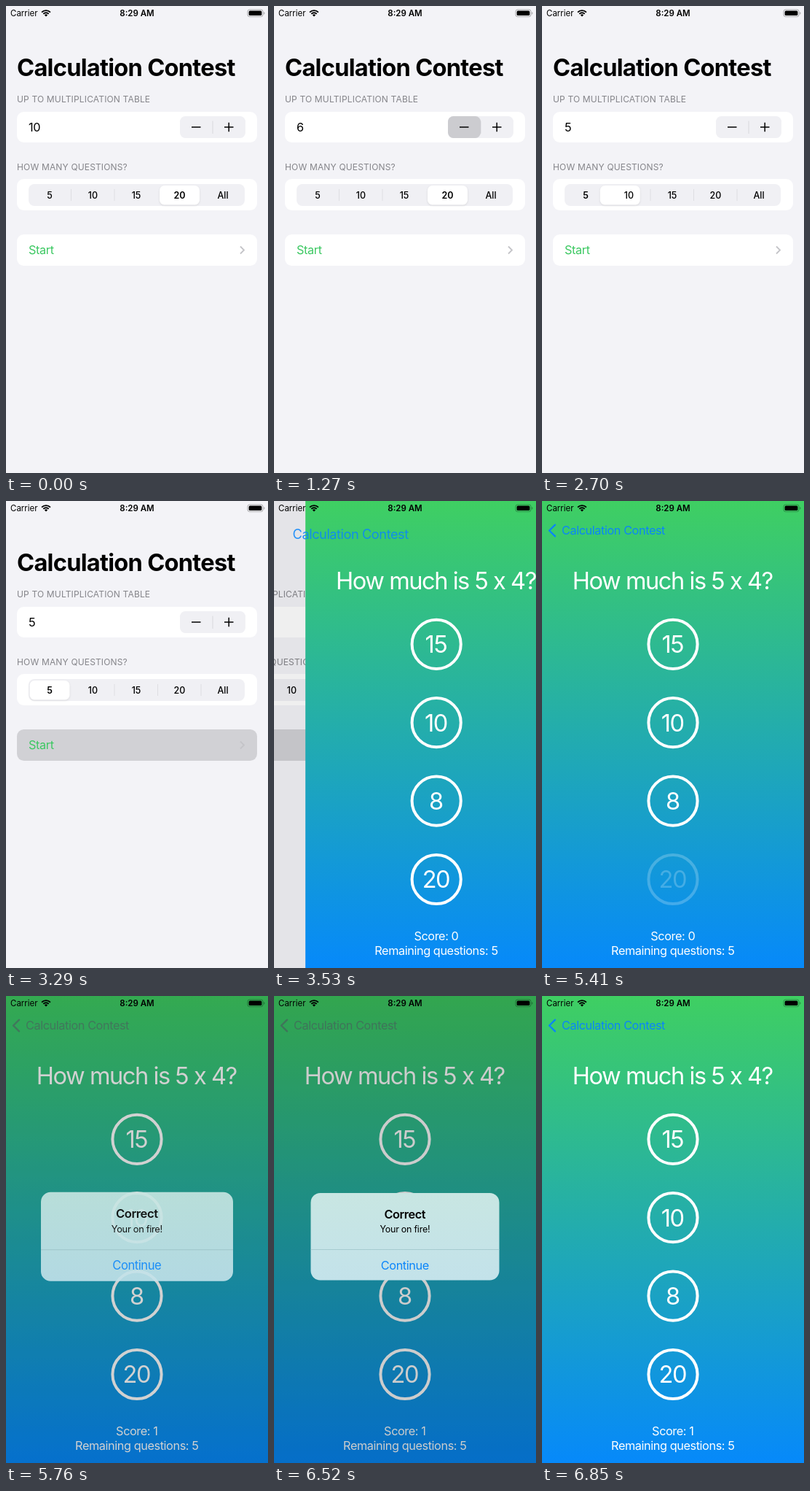
An HTML page with a canvas that plays this animation: 360 px wide and 640 px high, repeating every 8 s.

```html
<!DOCTYPE html>
<html lang="en">
<head>
<meta charset="utf-8">
<title>Calculation Contest</title>
<style>
html, body { margin: 0; width: 100%; height: 100%; overflow: hidden; }
canvas { display: block; width: 360px; height: 640px; }
</style>
</head>
<body>
<canvas id="stage"></canvas>
<script>
const LOOP = 8000, W = 360, H = 640;
const TITLE = 'Calculation Contest';
const BODY = 16.3, SMALL = 12.5, LARGE = 32.6, TIGHT = -0.045;
const BLUE = '#0a85fa', FILL = '#f0f0f4';

const canvas = document.getElementById('stage');
const ctx = canvas.getContext('2d');
const dpr = window.devicePixelRatio || 1;
canvas.width = W * dpr;
canvas.height = H * dpr;

// Bursts of motion: start, end, number of pictures. Between them all is still.
const bursts = [
  [700, 1380, 7], [1610, 1830, 3], [2700, 2930, 3],
  [3290, 3760, 5], [5410, 5960, 6], [6410, 6850, 5]
];

function snap(t) {
  let held = 0;
  for (const [start, end, count] of bursts) {
    if (t < start) break;
    const step = (end - start) / (count - 1);
    held = t >= end ? end : start + Math.floor((t - start) / step) * step;
  }
  return held;
}

const clamp = v => Math.max(0, Math.min(1, v));
const mix = (a, b, p) => a + (b - a) * p;
const easeOut = (t, start, length, power = 3) =>
  1 - Math.pow(1 - clamp((t - start) / length), power);

// y is the middle of the capital letters
function text(str, x, y, size, { color = '#000', weight = 400, align = 'left', track = -0.026 } = {}) {
  const spacing = size * track;
  ctx.font = `${weight} ${size}px Inter, "Open Sans", sans-serif`;
  ctx.letterSpacing = spacing + 'px';
  ctx.textAlign = align;
  ctx.fillStyle = color;
  ctx.fillText(str, align === 'center' ? x + spacing / 2 : x, y + size * 0.364);
}

function box(x, y, w, h, r, color) {
  ctx.beginPath();
  ctx.roundRect(x, y, w, h, r);
  ctx.fillStyle = color;
  ctx.fill();
}

function line(points, width, color) {
  ctx.beginPath();
  points.forEach(([x, y]) => ctx.lineTo(x, y));
  ctx.lineWidth = width;
  ctx.strokeStyle = color;
  ctx.stroke();
}

function faded(alpha, draw) {
  if (alpha <= 0) return;
  ctx.save();
  ctx.globalAlpha *= alpha;
  draw();
  ctx.restore();
}

function vertical(y0, y1, from, to) {
  const g = ctx.createLinearGradient(0, y0, 0, y1);
  g.addColorStop(0, from);
  g.addColorStop(1, to);
  return g;
}

function stepper(t) {
  const taps = [700, 890, 1080, 1260, 1610].filter(tap => tap <= t);
  const glow = taps.length ? 1 - clamp((t - taps[taps.length - 1]) / 120) : 0;
  text(String(10 - taps.length), 31, 166, BODY);
  box(239, 151, 90, 30, 7.5, FILL);
  box(283.5, 157.5, 1, 17.5, 0, '#d8d8dc');
  faded(glow, () => box(239, 151, 45, 30, 7.5, '#cbcbcf'));
  line([[255, 166], [267.5, 166]], 1.5, '#000');
  line([[300, 166], [312.5, 166]], 1.5, '#000');
  line([[306.2, 159.7], [306.2, 172.3]], 1.5, '#000');
}

function segments(t) {
  const labels = ['5', '10', '15', '20', 'All'];
  const width = 59.5;
  const chosen = t < 2700 ? 3 : 0;
  const pill = mix(3, 0, t < 2700 ? 0 : easeOut(t, 2590, 340, 3.4));
  box(31, 244, 297, 30, 8, FILL);
  for (let i = 0; i < 4; i++) {
    if (i !== chosen && i !== chosen - 1) box(89 + i * width, 251, 1, 16, 0, '#dedee2');
  }
  ctx.save();
  ctx.shadowColor = 'rgba(0,0,0,.1)';
  ctx.shadowBlur = 3 * dpr;
  ctx.shadowOffsetY = dpr;
  box(32.5 + pill * width, 246, 55, 26.5, 6.5, '#fff');
  ctx.restore();
  labels.forEach((label, i) => text(label, 60 + i * width, 259, SMALL,
    { weight: i === chosen ? 600 : 500, align: 'center', track: 0 }));
}

function settings(t) {
  const grey = { color: '#85858a', track: 0.013 };
  ctx.fillStyle = '#f3f3f7';
  ctx.fillRect(0, 0, W, H);
  text('UP TO MULTIPLICATION TABLE', 15, 128, 12, grey);
  box(15, 145, 330, 42, 9.5, '#fff');
  stepper(t);
  text('HOW MANY QUESTIONS?', 15, 220.5, 12, grey);
  box(15, 237, 330, 43, 9.5, '#fff');
  segments(t);
  box(15, 313, 330, 43, 9.5, t >= 3290 ? '#d1d1d5' : '#fff');
  text('Start', 31, 334.5, BODY, { color: '#3cc862' });
  line([[322, 329.5], [327, 334.5], [322, 339.5]], 1.8, '#c4c4c8');
}

function quiz(t) {
  const white = { color: '#fff', align: 'center' };
  const big = { ...white, track: TIGHT };
  ctx.fillStyle = vertical(0, H, '#3fcf62', '#0689fa');
  ctx.fillRect(0, 0, W, H);
  text('How much is 5 x 4?', 180, 109, LARGE, big);
  [15, 10, 8, 20].forEach((answer, i) => {
    const y = 196.3 + i * 107.4;
    const pressed = i === 3 && t >= 5410;
    faded(pressed ? mix(0.22, 1, clamp((t - 5480) / 250)) : 1, () => {
      ctx.beginPath();
      ctx.arc(180, y, 33.6, 0, 7);
      ctx.lineWidth = 4;
      ctx.strokeStyle = '#fff';
      ctx.stroke();
      text(String(answer), 180, y, LARGE, big);
    });
  });
  text('Score: ' + (t < 5480 ? 0 : 1), 180, 596.5, BODY, white);
  text('Remaining questions: 5', 180, 616.5, BODY, white);
}

// The large heading shrinks into the label of the back button.
function heading(t, push) {
  const x = mix(15, 27, push), y = mix(84.5, 40.5, push), size = mix(LARGE, BODY, push);
  const color = t >= 5500 && t < 6600 ? '#4f9170' : BLUE;
  faded(1 - push * 1.2, () => text(TITLE, x, y, size, { weight: 700, track: -0.022 }));
  faded(push, () => text(TITLE, x, y, size, { color }));
  faded(clamp((push - 0.88) / 0.12), () => {
    ctx.lineCap = ctx.lineJoin = 'round';
    line([[18, 32.7], [10, 40.5], [18, 48.3]], 2.4, color);
  });
}

function statusBar() {
  text('Carrier', 6, 10, 11.5, { track: 0 });
  text('8:29 AM', 180, 10, 11.5, { weight: 600, align: 'center', track: 0 });
  const from = -Math.PI * 0.75, to = -Math.PI * 0.25;
  ctx.strokeStyle = ctx.fillStyle = '#000';
  ctx.lineWidth = 1.9;
  for (const r of [5.2, 8.4]) {
    ctx.beginPath();
    ctx.arc(55, 14.5, r, from, to);
    ctx.stroke();
  }
  ctx.beginPath();
  ctx.moveTo(55, 14.5);
  ctx.arc(55, 14.5, 3, from, to);
  ctx.fill();
  ctx.beginPath();
  ctx.roundRect(332, 5, 21, 9.6, 2.6);
  ctx.lineWidth = 1;
  ctx.strokeStyle = 'rgba(0,0,0,.3)';
  ctx.stroke();
  box(333.6, 6.5, 17.8, 6.6, 1.5, '#000');
  box(354.2, 8.2, 1.2, 3.2, [0, 1, 1, 0], 'rgba(0,0,0,.3)');
}

function alertBox(t) {
  const shown = easeOut(t, 5480, 480);
  const alpha = t < 6500 ? shown : 1 - easeOut(t, 6520, 330);
  const scale = mix(1.2, 1, shown);
  const centre = { align: 'center' };
  faded(alpha, () => {
    ctx.fillStyle = 'rgba(0,0,0,.2)';
    ctx.fillRect(0, 0, W, H);
    ctx.translate(180, 330);
    ctx.scale(scale, scale);
    ctx.translate(-180, -330);
    box(50.5, 270, 259, 119.5, 13, vertical(270, 390, '#c8e6e2', '#c3e2ea'));
    if (t >= 6410 && t < 6500) box(50.5, 347.5, 259, 42, [0, 0, 13, 13], 'rgba(0,0,0,.08)');
    box(50.5, 347, 259, 0.8, 0, '#9cc3c9');
    text('Correct', 180, 299, BODY, { ...centre, weight: 600 });
    text('Your on fire!', 180, 319.7, SMALL, { ...centre, track: -0.02 });
    text('Continue', 180, 368.7, BODY, { ...centre, color: BLUE });
  });
}

function draw(now) {
  const t = snap(now % LOOP);
  const push = easeOut(t, 3290, 470, 3.06);
  ctx.setTransform(dpr, 0, 0, dpr, 0, 0);
  ctx.lineCap = 'butt';
  ctx.lineJoin = 'miter';

  if (push < 1) {
    ctx.save();
    ctx.translate(-0.3 * W * push, 0);
    settings(t);
    ctx.restore();
    ctx.fillStyle = `rgba(0,0,0,${0.07 * push})`;
    ctx.fillRect(0, 0, W, H);
  }
  if (push > 0) {
    ctx.save();
    ctx.translate(W * (1 - push), 0);
    quiz(t);
    ctx.restore();
  }
  heading(t, push);
  ctx.lineCap = 'butt';
  if (t >= 5480) alertBox(t);
  statusBar();
}

const begin = performance.now();
function tick() {
  draw(performance.now() - begin);
  requestAnimationFrame(tick);
}
tick();
</script>
</body>
</html>
```
